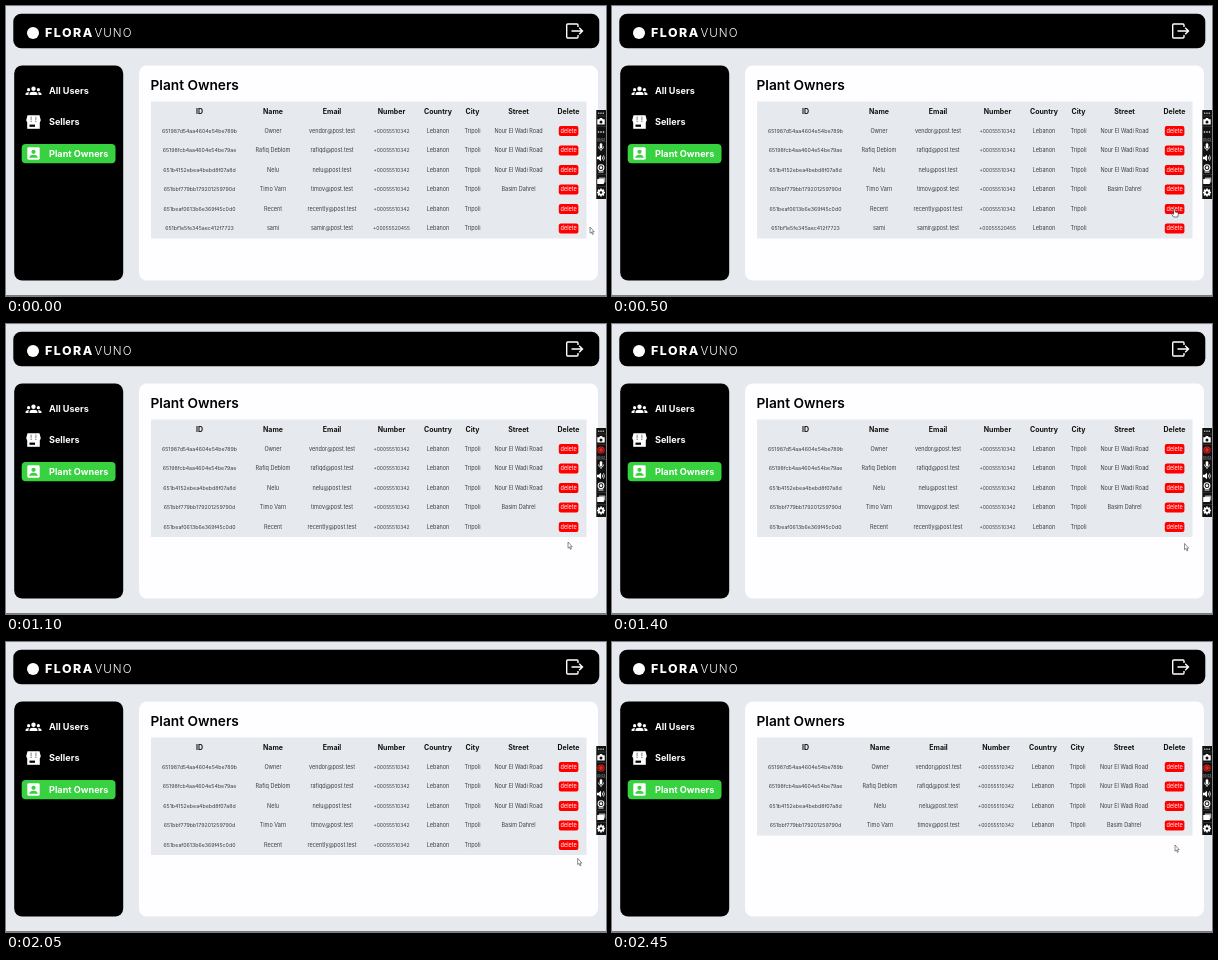
Write an HTML page with a canvas that moves like this. It is 600 px wide and 290 px high and loops after 2550 ms.

```html
<!DOCTYPE html>
<html lang="en">
<head>
<meta charset="utf-8">
<title>Plant Owners</title>
<style>
  html, body { margin: 0; width: 100%; height: 100%; overflow: hidden; background: #e6e9ee; }
  canvas { display: block; width: 600px; height: 290px; }
</style>
</head>
<body>
<canvas id="stage" width="600" height="290"></canvas>
<script>
const ctx = document.getElementById('stage').getContext('2d');
const LOOP = 2550, STEP = 50;
const FONT = 'Inter, "Open Sans", sans-serif';
const PANEL = '#e6e9ed', CARD = '#fefdff', RED = '#fe0000', GREEN = '#38d13f';
const FIRST_ROW = 125, ROW_GAP = 19.5;

const headings = ['ID', 'Name', 'Email', 'Number', 'Country', 'City', 'Street', 'Delete'];
const wideColumns = [193.5, 267, 326, 385.5, 432, 466.5, 512.5, 562.5];
const shortColumns = [193.5, 268, 326.5, 384, 431, 465.5, 512, 562.5];
const phone = '+00055510342', street = 'Nour El Wadi Road';
const owners = [
  ['651987d54aa4604e54be789b', 'Owner', 'vendor@post.test', phone, street],
  ['65198fcb4aa4604e54be79ae', 'Rafiq Deblom', 'rafiqd@post.test', phone, street],
  ['651b4152ebea4bebd8f07a8d', 'Nelu', 'nelu@post.test', phone, street],
  ['651bbf779bb179201259790d', 'Timo Varn', 'timov@post.test', phone, 'Basim Dahrel'],
  ['651beaf0613b6e369f45c0d0', 'Recent', 'recently@post.test', phone, ''],
  ['651bf1e5fe345aec412f7723', 'sami', 'samir@post.test', '+00055520455', '']
];

// Pointer path: time, x, y
const path = [
  [0, 584, 221], [100, 584, 221], [400, 562.5, 203], [600, 562.5, 203],
  [800, 562.5, 220], [1000, 562, 218], [1200, 562, 218], [1600, 583, 221],
  [1750, 585, 237], [1850, 585, 237], [2200, 563, 203], [LOOP, 563, 203]
];

function box(x, y, w, h, r, color) {
  ctx.fillStyle = color;
  ctx.beginPath();
  ctx.roundRect(x, y, w, h, r);
  ctx.fill();
}

function dot(x, y, r, color) {
  ctx.fillStyle = color;
  ctx.beginPath();
  ctx.arc(x, y, r, 0, Math.PI * 2);
  ctx.fill();
}

function shape(d, fill, stroke, width = 1) {
  const p = new Path2D(d);
  if (fill) { ctx.fillStyle = fill; ctx.fill(p); }
  if (stroke) { ctx.strokeStyle = stroke; ctx.lineWidth = width; ctx.stroke(p); }
}

function text(str, x, y, size, weight, color, align = 'left', spacing = 0) {
  ctx.font = `${weight} ${size}px ${FONT}`;
  ctx.letterSpacing = spacing + 'px';
  ctx.textAlign = align;
  ctx.fillStyle = color;
  ctx.fillText(str, x, y);
}

function at(x, y, draw) {
  ctx.save();
  ctx.translate(x, y);
  draw();
  ctx.restore();
}

function drawHeader() {
  box(7.3, 7.7, 586, 34.6, 8, '#000');
  dot(27, 27, 6, '#fff');
  text('FLORA', 39, 31.3, 12.4, 800, '#fff', 'left', 1.5);
  text('VUNO', 88.5, 31.3, 11.6, 300, '#fff', 'left', 1);
  shape('M572 21V19Q572 18 571 18H561.7Q560.7 18 560.7 19V31Q560.7 32 561.7 32H571Q572 32 572 31V29M565.5 25H576.5M573.2 21.7L576.5 25L573.2 28.3', null, '#fff', 1.4);
}

function drawSidebar() {
  box(8.2, 59.5, 109, 215, 8, '#000');
  box(15.7, 138, 93.8, 19.2, 4, GREEN);
  at(27.5, 85, () => {
    dot(0, -2.2, 2.2, '#fff');
    dot(-4.9, -1.3, 1.6, '#fff');
    dot(4.9, -1.3, 1.6, '#fff');
    shape('M-4 4V3Q-4 .8 0 .8Q4 .8 4 3V4ZM-8 4V2.7Q-7.5 .9-4.5 .9Q-5.2 2-5 4ZM8 4V2.7Q7.5 .9 4.5 .9Q5.2 2 5 4Z', '#fff');
  });
  at(27.5, 116, () => {
    shape('M-6-6.8H6L7.3-1.8Q7 .6 4.9 .6Q3.2 .6 2.4-.7Q1.5 .6 0 .6Q-1.5 .6-2.4-.7Q-3.2 .6-4.9 .6Q-7 .6-7.3-1.8Z', '#fff');
    shape('M-6.3 0H6.3V6.8H-6.3Z', '#fff');
    shape('M-4 2.6H1.5V4.8H-4Z', '#000');
    shape('M-2.4-5.4V-1.6M2.4-5.4V-1.6', null, '#000', .5);
  });
  at(27.5, 147.5, () => {
    box(-6.2, -6.2, 12.4, 12.4, 1.4, '#fff');
    dot(0, -1.7, 2.1, GREEN);
    shape('M-4.2 4.3V3.4Q-3.3 1.2 0 1.2Q3.3 1.2 4.2 3.4V4.3Z', GREEN);
  });
  ['All Users', 'Sellers', 'Plant Owners'].forEach((label, i) =>
    text(label, 43, 88.2 + i * 31.2, 9.1, 700, '#fff'));
}

function drawTable(count) {
  const columns = count > 4 ? wideColumns : shortColumns;
  box(133, 59.5, 459, 215, 8, CARD);
  text('Plant Owners', 144.5, 84, 13.7, 600, '#000');
  box(145, 95.5, 435.5, 20 + count * ROW_GAP, 0, PANEL);
  headings.forEach((label, i) => text(label, columns[i], 108, 7, 700, '#111', 'center'));
  owners.slice(0, count).forEach(([id, name, email, number, road], row) => {
    const y = FIRST_ROW + row * ROW_GAP;
    [id, name, email, number, 'Lebanon', 'Tripoli', road].forEach((value, i) => {
      const size = i === 0 ? 5.25 : i === 3 ? 5 : 5.5;
      text(value, columns[i], y + 1.9, size, 400, '#3c3e42', 'center');
    });
    box(552.8, y - 4.9, 19.6, 9.8, 2, RED);
    text('delete', 562.6, y + 1.9, 5.5, 400, '#fff', 'center');
  });
}

function drawRecorder(t) {
  box(590.3, 104, 10, 89, 0, '#111');
  for (let i = 0; i < 3; i++) box(592 + i * 2.3, 106.5, 1.4, 1.4, 0, '#aaa');
  shape('M590 110H600M590 120.5H600M590 135.5H600M590 168.5H600M590 180.5H600', null, '#444', .6);
  at(595, 115.5, () => {
    shape('M-3.7-2.2H-1.8L-1-3.4H1L1.8-2.2H3.7V3H-3.7Z', '#fff');
    dot(0, .4, 1.5, '#111');
  });
  if (t < 850) {
    for (let i = -1; i < 2; i++) dot(595 + i * 2.5, 126, .8, '#fff');
  } else {
    const ring = t < 1000 ? '#ddd' : '#f02020';
    dot(595, 126, 3.6, ring);
    dot(595, 126, 2.6, '#111');
    dot(595, 126, 2, ring);
  }
  text('00:0' + (t < 1500 ? 2 : 3), 595, 134.5, 2.8, 400, '#ccc', 'center');
  at(595, 141, () => {
    box(-1.3, -3.7, 2.6, 5, 1.3, '#fff');
    shape('M-2.5-.5Q-2.5 2.2 0 2.2Q2.5 2.2 2.5-.5M0 2.2V4', null, '#fff', .8);
  });
  at(595, 152, () => {
    shape('M-4-1.2H-2.3L0-3.2V3.2L-2.3 1.2H-4Z', '#fff');
    shape('M1.2-1.5Q2 0 1.2 1.5M2.5-2.7Q4.2 0 2.5 2.7', null, '#fff', .8);
  });
  at(595, 162, () => {
    dot(0, -.3, 3.4, '#fff');
    dot(0, -.3, 2.4, '#111');
    dot(0, -.3, 1.4, '#fff');
    shape('M-2.5 4H2.5', null, '#fff', 1);
  });
  box(592.8, 171.5, 6.5, 5, .5, '#aaa');
  box(591.2, 173, 6.7, 5, .5, '#fff');
  at(595, 186.5, () => {
    ctx.fillStyle = '#fff';
    for (let i = 0; i < 8; i++) {
      ctx.rotate(Math.PI / 4);
      ctx.fillRect(-.8, -4, 1.6, 2);
    }
    dot(0, 0, 3, '#fff');
    dot(0, 0, 1.3, '#111');
  });
}

function pointerAt(t) {
  const next = path.findIndex(key => key[0] > t);
  const [t0, x0, y0] = path[next - 1], [t1, x1, y1] = path[next];
  const p = (t - t0) / (t1 - t0), ease = p * p * (3 - 2 * p);
  return [x0 + (x1 - x0) * ease, y0 + (y1 - y0) * ease];
}

function drawPointer(t, count) {
  const [x, y] = pointerAt(t);
  const row = Math.round((y - FIRST_ROW) / ROW_GAP);
  const over = row < count && x > 552 && x < 573 &&
    Math.abs(y - FIRST_ROW - row * ROW_GAP) < 5;
  at(x, y, () => {
    if (over) {
      shape('M-.8 .5Q0-.5 .8 .5V3L3.2 3.5Q4 3.8 3.8 5L3.2 8H-.8L-3 5Q-3 4-2 4.4L-.8 5.2Z', '#fff', '#222', .6);
    } else {
      shape('M0 0V6.2L1.4 5L2.4 7.4L3.4 7L2.4 4.7H4.2Z', '#fff', '#444', .6);
    }
  });
}

function draw(t) {
  const count = t < 1100 ? 6 : t < 2450 ? 5 : 4;
  box(0, 0, 600, 290, 0, '#e6e9ee');
  box(0, 0, 600, 1, 0, '#e3dff5');
  box(0, 289, 600, 1, 0, '#77797d');
  drawHeader();
  drawSidebar();
  drawTable(count);
  drawRecorder(t);
  drawPointer(t, count);
}

function tick() {
  const t = performance.now() % LOOP;
  draw(Math.floor(t / STEP) * STEP);
  requestAnimationFrame(tick);
}
tick();
</script>
</body>
</html>
```
